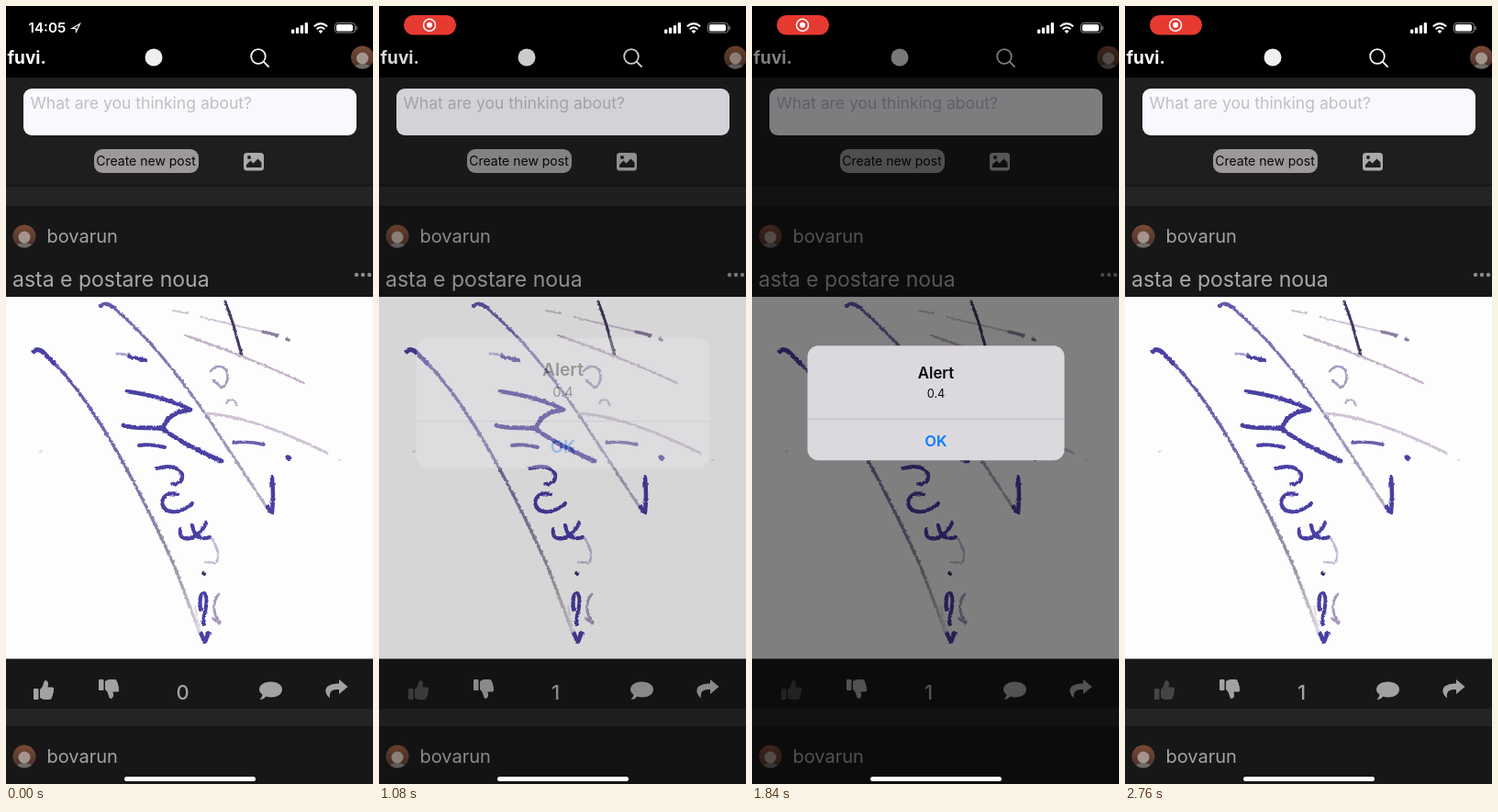
Write an HTML page that moves like this. It is 400 by 848 pixels and loops after 2800 ms.

```html
<!DOCTYPE html>
<html lang="ro">
<head>
<meta charset="utf-8">
<title>Feed</title>
<style>
  html, body { margin: 0; width: 100%; height: 100%; overflow: hidden; background: #000; }
  svg { display: block; width: 400px; height: 848px; font-family: Inter, "Open Sans", sans-serif; }
  .mid { text-anchor: middle; }
  .ink path { fill: none; stroke-linecap: round; stroke-linejoin: round; }
</style>
</head>
<body>
<svg viewBox="0 0 400 848">
  <defs>
    <linearGradient id="fur" x1="0" y1="0" x2="0" y2="1">
      <stop offset="0" stop-color="#7b4a35"/>
      <stop offset="1" stop-color="#46302a"/>
    </linearGradient>
    <linearGradient id="fade" gradientUnits="userSpaceOnUse" x1="50" y1="387" x2="214" y2="690">
      <stop offset="0" stop-color="#5c53ac"/>
      <stop offset=".5" stop-color="#807ba8"/>
      <stop offset=".76" stop-color="#9c94a4"/>
      <stop offset="1" stop-color="#e2dae3"/>
    </linearGradient>
    <linearGradient id="fade2" gradientUnits="userSpaceOnUse" x1="105" y1="325" x2="288" y2="552">
      <stop offset="0" stop-color="#6a60b0"/>
      <stop offset=".45" stop-color="#8a82b0"/>
      <stop offset="1" stop-color="#bdb1c4"/>
    </linearGradient>
    <filter id="rough" filterUnits="userSpaceOnUse" x="0" y="317" width="400" height="395" color-interpolation-filters="sRGB">
      <feTurbulence type="fractalNoise" baseFrequency=".3" numOctaves="2" seed="4"/>
      <feDisplacementMap in="SourceGraphic" scale="3" xChannelSelector="R" yChannelSelector="G"/>
    </filter>
    <clipPath id="disc"><circle r="12.5"/></clipPath>
    <g id="avatar" clip-path="url(#disc)">
      <rect x="-13" y="-13" width="26" height="26" fill="url(#fur)"/>
      <ellipse cy="13" rx="10" ry="6" fill="#6e6a68"/>
      <circle cy="1" r="6.500" fill="#a3958c"/>
    </g>
    <g id="thumb">
      <rect x="-11" y="-2" width="5.500" height="12" rx="1"/>
      <path d="M-4-1C0-4-.5-9 1.500-11Q6.500-11 4.500-3.500H9.500Q12-3 10.800 0Q11.500 2 10 4Q10.500 6 9 7Q9 10 6 10H1Q-1 10-4 8Z"/>
    </g>
  </defs>

  <rect width="400" height="848" fill="#171717"/>
  <rect width="400" height="78" fill="#000"/>
  <rect y="78" width="400" height="116" fill="#1e1e1e"/>
  <rect y="194" width="400" height="3" fill="#191919"/>
  <rect y="197" width="400" height="21" fill="#242424"/>

  <text x="1.500" y="63" font-size="19" font-weight="700" fill="#fff">fuvi.</text>
  <circle cx="161" cy="56" r="9.500" fill="#f1eef2"/>
  <g fill="none" stroke="#f2f2f2" stroke-width="1.800" stroke-linecap="round">
    <circle cx="275" cy="55" r="7.800"/><path d="M280.700 60.700L286 66"/>
  </g>
  <use href="#avatar" x="388.500" y="56"/>

  <rect x="19" y="90" width="363" height="51" rx="9" fill="#f9f8ff"/>
  <text x="26.500" y="112" font-size="17.550" fill="#bfbec4">What are you thinking about?</text>
  <rect x="96" y="156" width="114" height="26" rx="9" fill="#9c989c"/>
  <text class="mid" x="152.500" y="174" font-size="14" fill="#080808">Create new post</text>
  <rect x="259" y="160" width="22" height="19.500" rx="3.500" fill="#aaa"/>
  <path d="M262 176V173L266.500 168.500L269.500 171.500L274.500 166.500L278.500 170.500V176Z" fill="#1e1e1e"/>
  <circle cx="265" cy="165" r="2" fill="#1e1e1e"/>

  <use href="#avatar" x="20" y="251"/>
  <text x="44.500" y="258" font-size="20" fill="#a3a3a3">bovarun</text>
  <text x="7" y="306" font-size="23" fill="#a9a9a9">asta e postare noua</text>
  <g fill="#8c8c8c"><circle cx="382" cy="293" r="2.200"/><circle cx="389" cy="293" r="2.200"/><circle cx="396" cy="293" r="2.200"/></g>

  <rect y="317" width="400" height="394.500" fill="#fefdfe"/>
  <g class="ink" id="ink" filter="url(#rough)"></g>

  <g fill="#a2a2a2">
    <use id="like" href="#thumb"/>
    <use id="dislike" href="#thumb"/>
    <text class="mid" id="count" x="192.500" y="755.500" font-size="22" font-weight="500"></text>
    <path id="bubble" d="M0-9.500C7-9.500 12.500-6 12.500-1S7 7.500 0 7.500Q-2.500 7.500-5 6.500Q-8 10-12 10Q-9 7-9 4.500Q-12.500 2-12.500-1C-12.500-6-7-9.500 0-9.500Z"/>
    <path id="share" d="M3-11L12.500-3L3 5V0C-4 0-8 1-7 9.500C-15 2-13-6.500 3-6.500Z"/>
  </g>
  <rect y="766" width="400" height="19" fill="#242424"/>
  <use href="#avatar" x="20" y="818"/>
  <text x="44.500" y="825" font-size="20" fill="#a3a3a3">bovarun</text>

  <rect id="dim" width="400" height="848" fill="#000"/>

  <g id="alert">
    <rect id="panel" x="-140" y="-62.500" width="280" height="125" rx="12"/>
    <path d="M-140 17.500H140" stroke="#b9b7bc" stroke-width=".8"/>
    <g class="mid">
      <text y="-26.500" font-size="16.800" font-weight="600" fill="#0a0a0a">Alert</text>
      <text y="-6" font-size="12.800" fill="#0a0a0a">0.4</text>
      <text y="47.500" font-size="16.500" font-weight="600" fill="#0a7aff">OK</text>
    </g>
  </g>

  <g id="clock" fill="#fff">
    <text x="24.500" y="29" font-size="15.200" font-weight="600">14:05</text>
    <path d="M72 24.500L80.500 19.500L76.500 28L76 24.500Z" fill="none" stroke="#fff" stroke-width="1.200"/>
  </g>
  <g id="record">
    <rect x="27" y="10" width="57" height="21.500" rx="10.500" fill="#e63a31"/>
    <circle cx="55" cy="20.800" r="6.500" fill="none" stroke="#fff" stroke-width="1.500"/>
    <circle cx="55" cy="20.800" r="3" fill="#fff"/>
  </g>
  <g fill="#fff">
    <rect x="311" y="25.500" width="3.300" height="4.500" rx="1"/>
    <rect x="315.900" y="23.500" width="3.300" height="6.500" rx="1"/>
    <rect x="320.800" y="21" width="3.300" height="9" rx="1"/>
    <rect x="325.700" y="18" width="3.300" height="12" rx="1"/>
    <path d="M343 30L340.500 27.300Q343 25.300 345.500 27.300Z"/>
    <g fill="none" stroke="#fff" stroke-width="2">
      <path d="M338.600 25.200Q343 21.400 347.400 25.200M335.800 22.200Q343 16 350.200 22.200"/>
    </g>
    <rect x="358.500" y="18.500" width="22" height="10.500" rx="3" fill="none" stroke="#8a8a8a"/>
    <rect x="360" y="20" width="18" height="7.500" rx="1.800"/>
    <rect x="381.500" y="22" width="1.300" height="4" rx=".6" fill="#8a8a8a"/>
    <rect x="129" y="840" width="143" height="5" rx="2.500"/>
  </g>
</svg>
<script>
const $ = id => document.getElementById(id);
const LOOP = 2800, LIKED = 960, OPEN = 1030, CLOSE = 1916;

// Pen strokes: colour, width, path
const dark = '#4a40a3', pale = '#cfc2d4';
const strokes = [
  ['url(#fade)', 3.4, 'M50 387C92 427 137 508 183 609L213 688'],
  [dark, 5, 'M30 376Q36 372 43 380L52 389'],
  ['url(#fade2)', 3, 'M104 327Q110 321 122 333C158 364 192 408 217 444L287 551'],
  ['#6459a8', 4.2, 'M103 327Q109 322 116 328'],
  [dark, 4.5, 'M290 514Q292 535 290 552L285 546'],
  [pale, 2, 'M182 332L198 335M212 339L250 348L284 356'],
  ['#8d7f9f', 3.5, 'M280 355L296 359M306 363L308 364'],
  ['#453a62', 3, 'M239 322L248 348L257 381'],
  ['#c0b0c6', 2.4, 'M195 359C240 374 290 395 325 411'],
  ['#a79bc0', 2.6, 'M223 398Q232 388 240 397Q245 409 235 416L226 408'],
  ['#b5abc8', 2.5, 'M240 433Q246 424 252 435'],
  [pale, 3, 'M217 444C260 446 310 468 350 487'],
  ['#6a5fa9', 3.5, 'M248 476Q265 474 281 478'],
  [dark, 5.5, 'M307 492L308 492.500'],
  ['#a9a2cf', 3, 'M121 379L134 380'],
  [dark, 4, 'M134 382L152 386'],
  [dark, 4.8, 'M132 420C158 424 182 430 201 440C184 442 174 449 171 461C188 474 212 486 235 496'],
  [dark, 4.8, 'M128 457C143 462 158 458 171 461'],
  [dark, 4, 'M145 479Q158 477 173 481'],
  [dark, 4, 'M164 504Q185 498 192 510Q194 521 181 521'],
  [dark, 4.2, 'M187 532Q172 529 170 541Q172 553 186 551Q198 548 203 542'],
  [dark, 4.2, 'M190 570Q188 583 202 580Q212 576 218 564M203 566Q206 584 222 579'],
  ['#c4b9d5', 2.4, 'M224 580Q235 596 229 607L217 606'],
  ['#3c3268', 4, 'M215 618L216 619'],
  [dark, 4.2, 'M212 658Q210 640 216 640Q221 644 216 664L215 674'],
  [dark, 4.5, 'M212 683L217 693L221 683'],
  ['#a499bb', 2.8, 'M232 641Q221 655 233 673L226 668'],
  ['#e2dae5', 2, 'M206 654L211 682M363 495L364 495M37 486L39 485']
];
$('ink').innerHTML = strokes.map(([c, w, d]) =>
  `<path stroke="${c}" stroke-width="${w}" d="${d}"/>`).join('');

const clamp = v => Math.min(1, Math.max(0, v));

// Critically damped spring from 0 to 1
function spring(ms, rate) {
  const x = Math.max(0, ms) * rate / 1000;
  return 1 - (1 + x) * Math.exp(-x);
}

const place = (id, x, y, more = '') => $(id).setAttribute('transform', `translate(${x} ${y}) ${more}`);

function draw(t) {
  const rec = clamp((t - 200) / 200);
  $('clock').style.opacity = 1 - rec;
  $('record').style.opacity = rec;

  const liked = t >= LIKED, shift = liked ? 2 : 0;
  place('like', 41 + shift, 746);
  place('dislike', 112 + shift, 744, 'scale(1 -1)');
  place('bubble', 288.5 - shift, 746);
  place('share', 360 - shift, 745);
  $('like').setAttribute('fill', liked ? '#444' : '#a2a2a2');
  $('count').textContent = liked ? 1 : 0;

  const enter = spring(t - OPEN, 22);
  const shown = enter * (1 - spring(t - CLOSE, 20));
  const tone = 245 - 26 * shown;
  $('dim').style.opacity = shown * .5;
  $('alert').style.opacity = shown;
  $('panel').setAttribute('fill', `rgb(${tone} ${tone - 2} ${tone + 3})`);
  place('alert', 200.5, 432.7, `scale(${1.2 - .2 * enter})`);
}

function tick() {
  draw(performance.now() % LOOP);
  requestAnimationFrame(tick);
}
tick();
</script>
</body>
</html>
```
